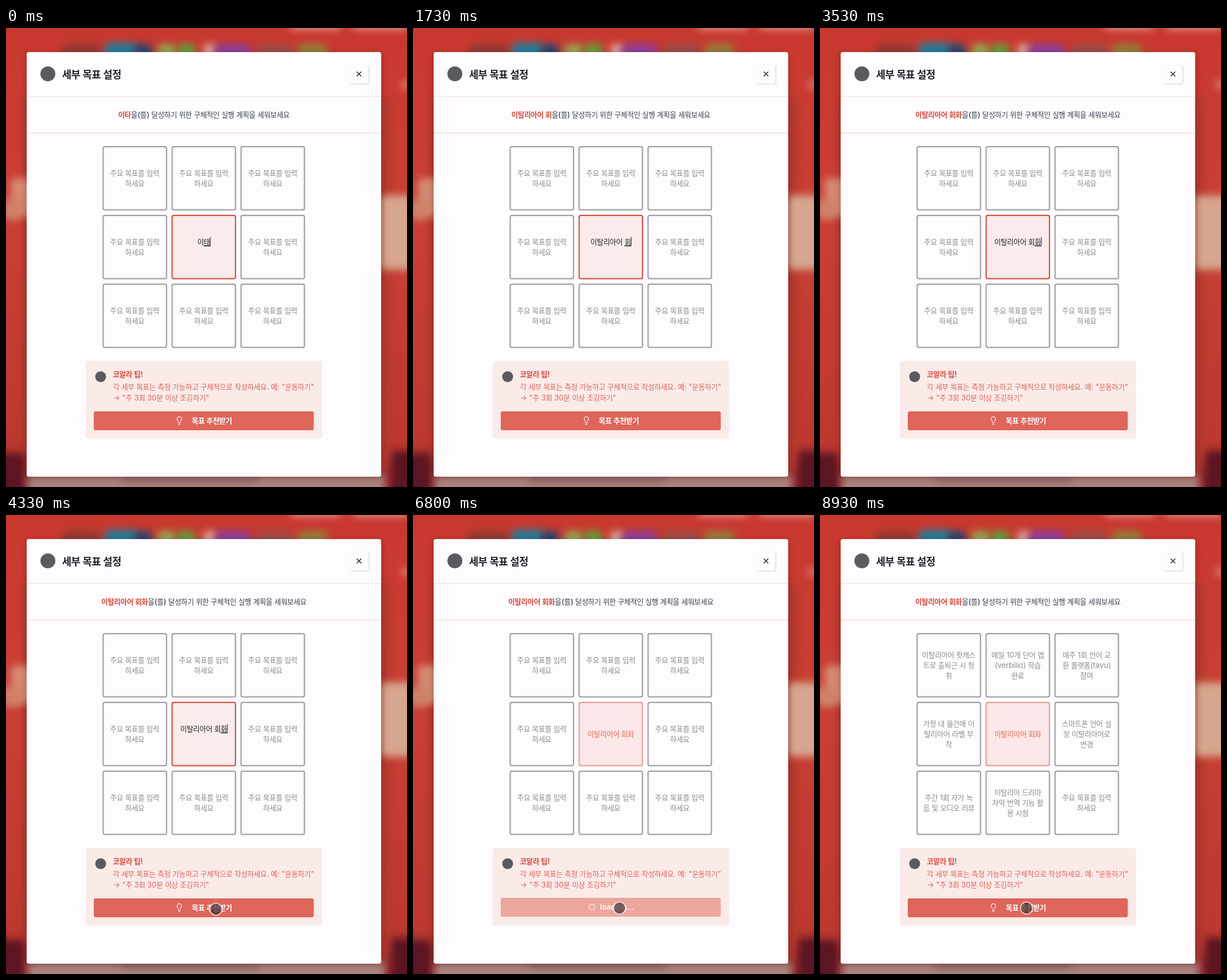
An HTML page with a canvas for the animation above (9000 ms loop, 699 by 801 pixels).

```html
<!DOCTYPE html>
<html lang="ko">
<head>
<meta charset="utf-8">
<title>세부 목표 설정</title>
<style>
  html, body { margin: 0; width: 100%; height: 100%; overflow: hidden; background: #c93a30; }
  canvas { display: block; width: 699px; height: 801px; }
</style>
</head>
<body>
<canvas id="stage" width="699" height="801"></canvas>
<script>
const W = 699, H = 801, LOOP = 9000;
const stage = document.getElementById('stage');
let ctx = stage.getContext('2d');

const FAMILY = 'Inter, "Noto Sans CJK KR", "Noto Sans CJK", sans-serif';
const HANGUL = /[ㄱ-힣]/;
const RED = '#d5483d', INK = '#1f2228', GREY = '#8b8b90';

const KEY = 150, LAG = 50, LAST_KEY = 14 * KEY, BLINK = 500;
const LOAD_START = 4800, LOAD_END = 8500;
const TYPED = ['이태', '이탈', '이탈ㄹ', '이탈리', '이탈링', '이탈리아', '이탈리앙', '이탈리아어',
  '이탈리아어 ', '이탈리아어 ㅎ', '이탈리아어 호', '이탈리아어 회', '이탈리아어 횧',
  '이탈리아어 회호', '이탈리아어 회화'];
const PROMPT = '주요 목표를 입력/하세요';
const PLANS = [
  '이탈리아어 팟캐스/트로 출퇴근 시 청/취', '매일 10개 단어 앱/(verbilio) 학습/완료', '매주 1회 언어 교/환 플랫폼(tavu)/참여',
  '가정 내 물건에 이/탈리아어 라벨 부/착', '', '스마트폰 언어 설/정 이탈리아어로/변경',
  '주간 1회 자가 녹/음 및 오디오 리뷰', '이탈리아 드라마/자막 번역 기능 활/용 시청', PROMPT];

const clamp = v => Math.max(0, Math.min(1, v));
const ease = v => v * v * (3 - 2 * v);
const mix = (a, b, p) => a + (b - a) * p;

// Hangul sits on a tight fixed pitch, other characters keep their own widths.
function layout(str, size, weight) {
  let x = 0;
  const parts = (str.match(/[ㄱ-힣]|[^ㄱ-힣]+/g) || []).map(s => {
    const wide = HANGUL.test(s);
    const font = `${weight} ${wide ? size * 0.97 : size}px ${FAMILY}`;
    ctx.font = font;
    const part = { s, font, x: wide ? x - size * 0.016 : x };
    x += wide ? size * 0.86 : ctx.measureText(s).width;
    return part;
  });
  return { parts, width: x };
}

function text(str, x, midY, color, { size = 13, weight = 400, center = false } = {}) {
  const { parts, width } = layout(str, size, weight);
  const left = center ? x - width / 2 : x;
  ctx.fillStyle = color;
  for (const p of parts) {
    ctx.font = p.font;
    ctx.fillText(p.s, left + p.x, midY + size * 0.37);
  }
  return left + width;
}

function box(x, y, w, h, r, fill) {
  ctx.beginPath();
  ctx.roundRect(x, y, w, h, r);
  ctx.fillStyle = fill;
  ctx.fill();
}

function disc(x, y, r, fill) {
  ctx.beginPath();
  ctx.arc(x, y, r, 0, Math.PI * 2);
  ctx.fillStyle = fill;
  ctx.fill();
}

function line(x1, y1, x2, y2) {
  ctx.beginPath();
  ctx.moveTo(x1, y1);
  ctx.lineTo(x2, y2);
  ctx.stroke();
}

function makeBackdrop() {
  const c = document.createElement('canvas');
  c.width = W;
  c.height = H;
  const g = c.getContext('2d');
  const red = g.createLinearGradient(0, 0, 0, H);
  red.addColorStop(0, '#c9382e');
  red.addColorStop(0.4, '#cb4034');
  red.addColorStop(0.9, '#bd392f');
  red.addColorStop(1, '#8d2529');
  g.fillStyle = red;
  g.fillRect(0, 0, W, H);

  const blobs = [
    [495, -14, 90, 17, '#dd8d84'], [602, -14, 100, 17, '#dd8d84'],
    [98, 28, 66, 30, '#8f3a33'], [172, 26, 58, 34, '#1f7d9b'], [224, 28, 30, 30, '#24466f'],
    [264, 28, 32, 30, '#93a853'], [298, 28, 32, 30, '#63a03c'], [344, 28, 24, 30, '#d8aa9e'],
    [364, 28, 62, 30, '#8c3f9c'], [436, 28, 64, 30, '#9a4c48'], [508, 28, 52, 30, '#93803a'],
    [30, 120, 640, 650, '#b4392f'],
    [8, 262, 40, 68, '#d58b74'], [-6, 300, 30, 34, '#cf8166'],
    [688, 92, 20, 14, '#dc7b70'], [652, 292, 60, 130, '#d6a68e'],
    [-20, 742, 52, 80, '#5c1522'], [672, 738, 50, 80, '#5c1522'],
    [38, 776, 622, 40, '#ad8580'], [200, 780, 240, 12, '#8d6663']];
  g.filter = 'blur(7px)';
  for (const [x, y, w, h, fill] of blobs) {
    g.fillStyle = fill;
    g.beginPath();
    g.roundRect(x, y, w, h, 8);
    g.fill();
  }
  g.filter = 'none';
  g.shadowColor = 'rgba(40,0,0,.3)';
  g.shadowBlur = 14;
  g.shadowOffsetY = 3;
  g.fillStyle = '#fefcfe';
  g.beginPath();
  g.roundRect(36, 42, 618, 741, 4);
  g.fill();
  return c;
}

function drawFrame() {
  disc(73, 80, 13, '#5c5a5f');
  text('세부 목표 설정', 98, 81, INK, { size: 18.3, weight: 700 });

  ctx.save();
  ctx.shadowColor = 'rgba(0,0,0,.18)';
  ctx.shadowBlur = 3;
  ctx.shadowOffsetX = ctx.shadowOffsetY = 1;
  box(599, 64, 32.5, 33, 3, '#fefdfe');
  ctx.restore();
  ctx.strokeStyle = INK;
  ctx.lineWidth = 1.4;
  line(611.3, 76.3, 619.3, 84.3);
  line(619.3, 76.3, 611.3, 84.3);

  ctx.lineWidth = 1;
  ctx.strokeStyle = '#eed9d8';
  line(36, 119.5, 654, 119.5);
  ctx.strokeStyle = '#f3cfca';
  line(36, 183.5, 654, 183.5);
}

function drawSubtitle(t) {
  const i = Math.min(TYPED.length - 1, Math.floor((t - LAG) / KEY));
  const goal = i < 0 ? '이타' : TYPED[i];
  const rest = '을(를) 달성하기 위한 구체적인 실행 계획을 세워보세요';
  const total = layout(goal, 13, 700).width + layout(rest, 13, 500).width;
  const x = text(goal, 345 - total / 2, 151.5, RED, { weight: 700 });
  text(rest, x, 151.5, '#374050', { weight: 500 });
}

function drawCell(col, row, border, fill) {
  const x = 168.3 + col * 120.2, y = 206 + row * 120;
  box(x, y, 112.6, 112.4, 4, border);
  box(x + 2, y + 2, 108.6, 108.4, 2.5, fill);
  ctx.strokeStyle = 'rgba(0,0,0,.03)';
  ctx.lineWidth = 2;
  ctx.strokeRect(x + 3, y + 3, 106.6, 106.4);
  return [x + 56.3, y + 56.2];
}

function drawInput(t) {
  if (t >= LOAD_START) {
    const [x, y] = drawCell(1, 1, '#eb998f', '#fae9e8');
    text(TYPED[14], x, y, '#e9948a', { weight: 700, center: true });
    return;
  }
  const [x, y] = drawCell(1, 1, RED, '#faecea');
  const typed = TYPED[Math.min(14, Math.floor(t / KEY))];
  const end = text(typed, x, y - 9.5, INK, { weight: 500, center: true });
  ctx.fillStyle = INK;
  if (!typed.endsWith(' ')) ctx.fillRect(end - 11.4, y - 2.9, 11.4, 1.6);
  const caretOn = t < LAST_KEY || Math.floor((t - LAST_KEY) / BLINK) % 2 === 0;
  if (caretOn) ctx.fillRect(end - 0.2, y - 17.5, 1, 15.5);
}

function drawGrid(t) {
  PLANS.forEach((plan, i) => {
    if (i === 4) return drawInput(t);
    const [x, y] = drawCell(i % 3, Math.floor(i / 3), '#9c9ca0', '#fefcfe');
    const lines = (t >= LOAD_END ? plan : PROMPT).split('/');
    lines.forEach((s, n) =>
      text(s, x, y + (n - (lines.length - 1) / 2) * 18.4, GREY, { center: true }));
  });
}

function drawBulb() {
  ctx.save();
  ctx.translate(302.2 - 12 * 0.66, 685 - 12 * 0.66);
  ctx.scale(0.66, 0.66);
  ctx.lineWidth = 1.8;
  ctx.stroke(new Path2D('M15 14c.2-1 .7-1.7 1.5-2.5 1-.9 1.5-2.2 1.5-3.5A6 6 0 0 0 6 8c0 1 .2 2.2 1.5 3.5.7.7 1.3 1.5 1.5 2.5M9 18h6M10 22h4'));
  ctx.restore();
}

function drawSpinner(t) {
  ctx.save();
  ctx.translate(311.7, 684.3);
  ctx.rotate((t - 5530) / 1016 * Math.PI * 2);
  ctx.lineWidth = 1.2;
  for (let i = 0; i < 8; i++) {
    line(0, -3.7, 0, -6.3);
    ctx.rotate(Math.PI / 4);
  }
  ctx.restore();
}

function drawTip(t) {
  box(139, 581, 412, 135.5, 4, '#faebe9');
  disc(165, 608.5, 9.5, '#5c5a5f');
  text('코알라 팁!', 186.5, 604.5, RED, { weight: 700 });
  text('각 세부 목표는 측정 가능하고 구체적으로 작성하세요. 예: "운동하기"', 186.5, 626.5, '#d8635a');
  text('→ "주 3회 30분 이상 조깅하기"', 186.5, 645, '#d8635a');

  ctx.strokeStyle = '#fff';
  ctx.lineCap = 'round';
  if (t >= LOAD_START && t < LOAD_END) {
    box(153, 668, 383.5, 33, 3, '#eca69e');
    drawSpinner(t);
    text('loading...', 326, 684.5, '#fff', { weight: 600 });
  } else {
    box(153, 669, 383.5, 33, 3, '#de665b');
    drawBulb();
    text('목표 추천받기', 324, 685.5, '#fff', { weight: 700 });
  }
  ctx.lineCap = 'butt';
}

function drawPointer(t) {
  const shown = clamp((t - 3700) / 150);
  if (!shown) return;
  const down = ease(clamp((t - 3700) / 600));
  const settle = ease(clamp((t - 4340) / 200));
  const x = mix(mix(385, 366, down), 360, settle);
  const y = mix(mix(430, 688, down), 686, settle);
  ctx.globalAlpha = shown;
  disc(x, y, 10.5, 'rgba(58,42,46,.68)');
  ctx.strokeStyle = 'rgba(255,240,238,.85)';
  ctx.lineWidth = 1.6;
  ctx.stroke();
  ctx.globalAlpha = 1;
}

const backdrop = makeBackdrop();

function render() {
  const t = performance.now() % LOOP;
  ctx.drawImage(backdrop, 0, 0);
  drawFrame();
  drawSubtitle(t);
  drawGrid(t);
  drawTip(t);
  drawPointer(t);
  requestAnimationFrame(render);
}
render();
</script>
</body>
</html>
```
